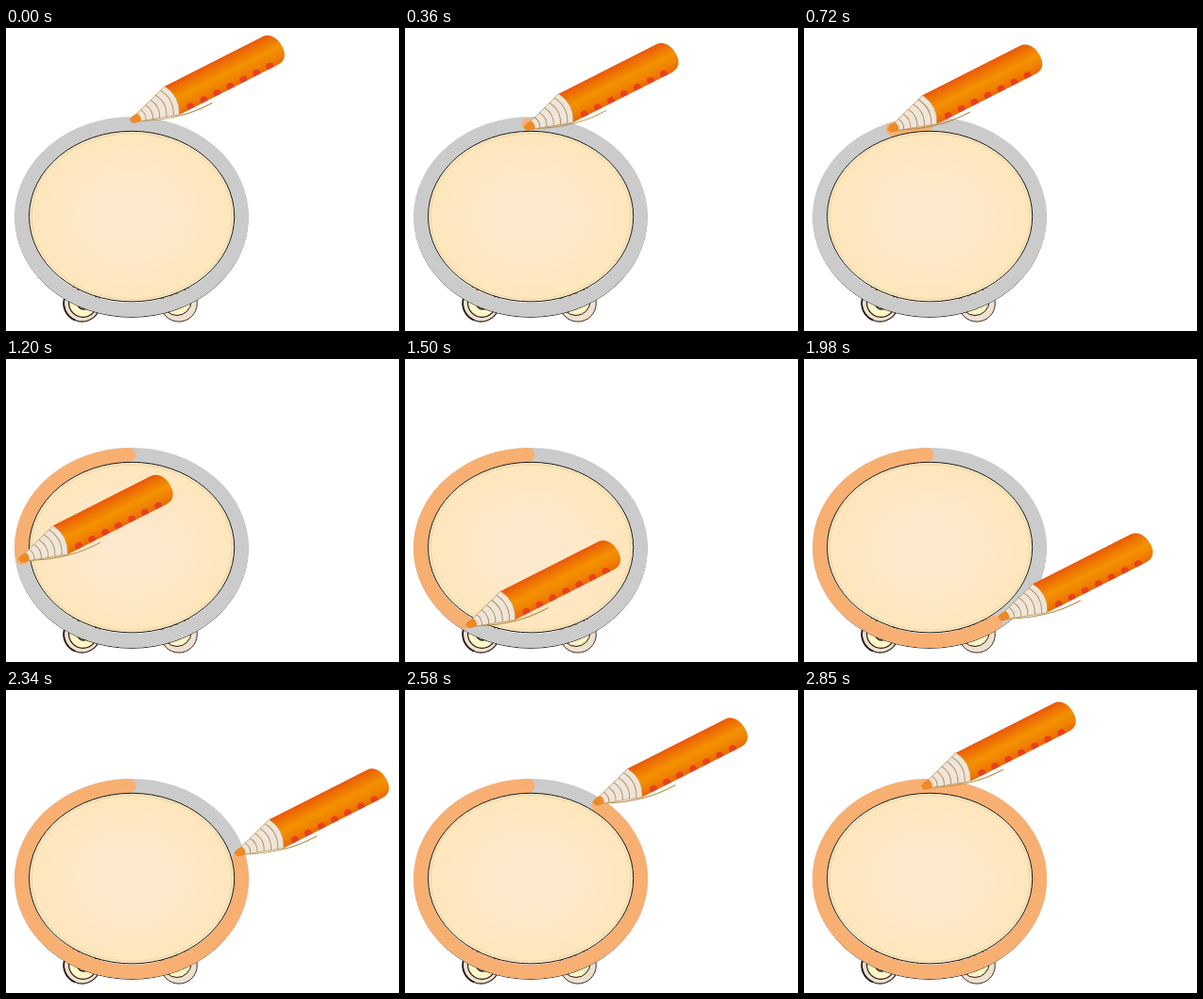
These frames come from a looping animation (416 by 321 pixels, 3000 ms). An HTML page:

```html
<!DOCTYPE html>
<html lang="en">
<head>
<meta charset="utf-8">
<title>Tambourine tracing</title>
<style>
html, body { margin: 0; width: 100%; height: 100%; overflow: hidden; background: #fff; }
svg { display: block; width: 416px; height: 321px; }
</style>
</head>
<body>
<svg viewBox="0 0 416 321" fill="none">
  <defs>
    <radialGradient id="skin">
      <stop offset="0" stop-color="#fce9cf"/>
      <stop offset=".5" stop-color="#fde8c8"/>
      <stop offset="1" stop-color="#fee6bc"/>
    </radialGradient>
    <linearGradient id="wood" x2="0" y2="1">
      <stop offset="0" stop-color="#ea570c"/>
      <stop offset=".2" stop-color="#ee7203"/>
      <stop offset=".5" stop-color="#f39200"/>
      <stop offset=".75" stop-color="#f08300"/>
      <stop offset="1" stop-color="#ec6608"/>
    </linearGradient>
    <clipPath id="bodyClip"><use href="#body"/></clipPath>
    <path id="body" d="M49-17H165C174-17 179-8 179 2C179 11 175 17 166 17H49Q59 0 49-17Z"/>
  </defs>

  <g stroke="#241a18">
    <circle cx="80.5" cy="291.8" r="19.3" fill="#efe0cf" stroke-width="1.1"/>
    <path d="M62 286A19.3 19.3 0 0 0 73 309.5" stroke-width="1.8"/>
    <circle cx="81.5" cy="291.3" r="15" fill="#fff6c6" stroke-width="1.2"/>
    <circle cx="82" cy="292" r="6" fill="#f8e3a6" stroke-width="1.5"/>
    <circle cx="183" cy="291.8" r="19.3" fill="#efe0cf" stroke-width=".9"/>
    <circle cx="181" cy="289.5" r="15" fill="#fff6c6" stroke-width="1"/>
    <circle cx="180" cy="288" r="7" fill="#f8e3a6" stroke-width=".8"/>
  </g>

  <ellipse cx="133" cy="201" rx="123" ry="105.3" stroke="#241a18"/>
  <ellipse cx="133" cy="200" rx="116.5" ry="98.5" stroke="#cbcbcb" stroke-width="15"/>
  <path id="paint" stroke="#f8af72" stroke-linecap="round"/>
  <ellipse cx="133.1" cy="199.6" rx="108.6" ry="90.3" fill="#fee9c4" stroke="#1d1715"/>
  <ellipse cx="133.1" cy="199.6" rx="106" ry="87.8" fill="url(#skin)" stroke="#e8cf9c" stroke-width=".8"/>

  <g id="pencil">
    <path d="M9 4Q30 14 49 18Q64 22 86 21.5" stroke="#b68a45"/>
    <path d="M0-2L8-4L49-17Q59 0 49 17L8 4L1 2Z" fill="#efe5d8" stroke="#b99868" stroke-width=".7"/>
    <path id="rings" stroke="#a98a60" stroke-width=".9"/>
    <path d="M0-2Q3-5 10-4.6Q13 0 10 4.6Q4 5 1 2Z" fill="#ee8a26"/>
    <use href="#body" fill="url(#wood)"/>
    <path id="dots" stroke="#e8401f" stroke-width="8" stroke-linecap="round" clip-path="url(#bodyClip)"/>
  </g>
</svg>
<script>
const LOOP = 3000, STEP = 30, START = 1.5;
// time, angle counter-clockwise from the top, tip offset x and y
const keys = [
  [0, 0.5, 0, -2.5], [240, 2, 0, 10], [450, 4, 0, 2], [570, 4, 0, 2],
  [720, 22, 0, 0], [1200, 98.7, -4, -1], [1500, 145.6, -2, 2],
  [1980, 219, 0, -1], [2340, 285, -3, 0], [2730, 349, 0, 1],
  [2850, 364, 0, 2], [LOOP, 364, 0, 2]
];
const el = id => document.getElementById(id);
const repeat = (n, f) => Array.from({ length: n }, (_, i) => f(i)).join('');

el('rings').setAttribute('d', repeat(5, i => {
  const x = 15 + i * 7, h = 4 + (x - 8) * 0.317;
  return `M${x} ${-h}Q${x + h * 0.6} 0 ${x} ${h}`;
}));
el('dots').setAttribute('d', repeat(7, i => `M${63.6 + i * 15.7} 14.8h.01`));

function pose(t) {
  const i = keys.findIndex(k => k[0] > t), a = keys[i - 1], b = keys[i];
  const u = (t - a[0]) / (b[0] - a[0]);
  return a.slice(1).map((v, j) => v + (b[j + 1] - v) * u);
}

function onRim(deg) {
  const r = deg * Math.PI / 180;
  return [133 - 116.5 * Math.sin(r), 200 - 98.5 * Math.cos(r)];
}

function draw(now) {
  const t = Math.floor(now % LOOP / STEP) * STEP;
  const [angle, dx, dy] = pose(t);
  const [x, y] = onRim(angle);
  el('pencil').setAttribute('transform', `translate(${x + dx} ${y + dy}) rotate(-26.9)`);

  const sweep = Math.min(359.9, Math.max(0.2, angle - 2.5 - START));
  const large = sweep > 180 ? 1 : 0;
  el('paint').setAttribute('d', `M${onRim(START)}A116.5 98.5 0 ${large} 0 ${onRim(START + sweep)}`);
  el('paint').setAttribute('stroke-width', 15 * Math.min(1, t / 450));
}

const origin = performance.now();
function frame() {
  draw(performance.now() - origin);
  requestAnimationFrame(frame);
}
frame();
</script>
</body>
</html>
```
